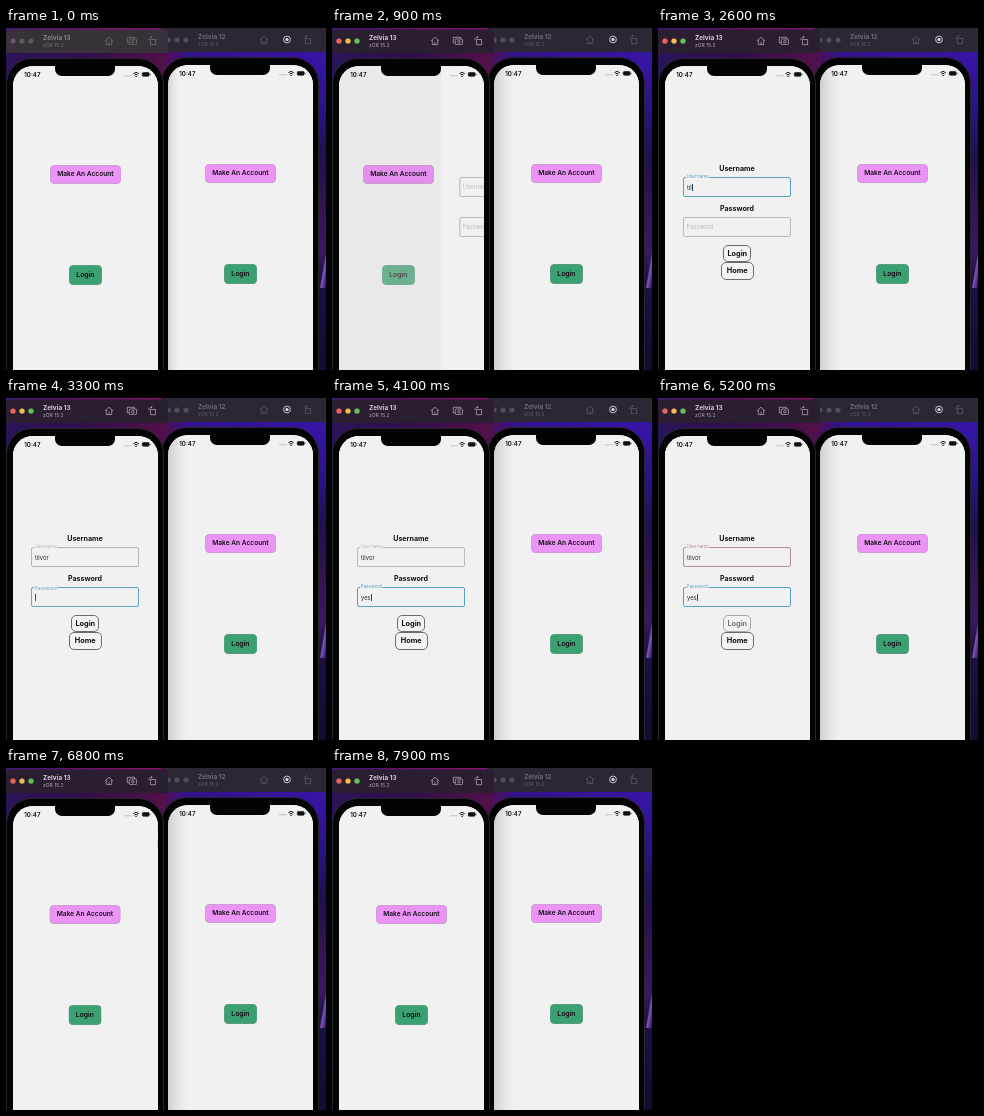
An HTML page for the animation above (8 s loop, 320 by 342 pixels).

```html
<!DOCTYPE html>
<html lang="en">
<head>
<meta charset="utf-8">
<title>Two phones: login flow</title>
<style>
html, body { margin: 0; width: 100%; height: 100%; overflow: hidden; background: #1d0d3c; }
body { font-family: Inter, "Liberation Sans", sans-serif; }
div, span, i, svg { box-sizing: border-box; }
.stage {
  position: relative; width: 320px; height: 342px; overflow: hidden;
  background:
    linear-gradient(90deg, #3f1a78, #6a1266 50%, #8a1470) 0 0 / 163px 4px no-repeat,
    linear-gradient(90deg, #2a1458, #300e4a 25%, #521048 50%, #33128c 58%, #3614a4) 0 0 / 312px 60px no-repeat,
    linear-gradient(100deg, #0000 98%, #7f56b4 98.4%, #50288a 99.4%, #0000) 0 190px / 320px 70px no-repeat,
    linear-gradient(#3716a6 24px, #2b128a 80px, #20104e 130px, #341454 180px, #3a1766 225px, #1c1046 250px, #150a33);
}
.win, .bar, .phone, .screen, .notch, .page, .page div, .page span, .over, .shade { position: absolute; }
.win { top: 0; left: 0; width: 164px; height: 344px; }
.right { left: 155px; top: -1px; }

/* title bar */
.bar { left: 0; top: 0; width: 162px; height: 25px; background: #38313a; color: #8b828d; }
.right .bar { width: 164px; background: #2d2733; color: #716878; }
.left .bar { clip-path: inset(1.5px 0 0 round 4px 4px 0 0); animation: active 8s step-end infinite; }
.bar b, .bar small { position: absolute; left: 37px; white-space: nowrap; }
.bar b { top: 6px; font: 700 6.4px/8px Inter, sans-serif; }
.bar small { top: 13.5px; font: 400 5px/7px Inter, sans-serif; opacity: .8; }
.bar svg { position: absolute; left: 0; top: 0; }
.lights { animation: lights 8s step-end infinite; }
.line { fill: none; stroke: currentColor; stroke-width: .7; opacity: .85; }

/* device */
.phone { left: .3px; top: 30.2px; width: 158px; height: 340px; border-radius: 26px; background: #030304; border: 1px solid #28242e; }
.screen { left: 6.5px; top: 37.5px; width: 145px; height: 320px; border-radius: 20px 20px 0 0; overflow: hidden; background: #f1f1f1; }
.notch { left: 49px; top: 36px; width: 60px; height: 12px; border-radius: 0 0 7px 7px; background: #030304; }
.over { left: 0; top: 0; }
.page { left: .5px; top: 0; width: 145px; height: 320px; background: #f1f1f1; }
.shade { left: 162px; top: 40px; width: 20px; height: 302px; transform-origin: left; background: linear-gradient(90deg, #0002, #0000000c 50%, #0000); animation: shade 8s step-end infinite; }

/* home page */
.page .btn { display: flex; align-items: center; justify-content: center; border-radius: 4px; font-weight: 600; color: #120c14; white-space: nowrap; }
.make, .go { height: 19.7px; }
.make { left: 37px; top: 99px; width: 70.8px; font-size: 6.6px; background: #ec93f6; border: 1px solid #cf9dd6; }
.go { left: 56px; top: 199.5px; width: 32.8px; font-size: 6.8px; background: #3ba072; border: 1px solid #579c80; }
.left .go { animation: tapGo 8s linear infinite; }
.left .home { animation: under 8s ease infinite; }
.dim { inset: 0; background: #000; opacity: 0; animation: dim 8s ease infinite; }

/* login page */
.form { transform: translateX(146px); animation: slide 8s ease infinite; }
.up, .down { left: 0; top: 0; width: 145px; }
.up { animation: up 8s step-end infinite; }
.down { animation: down 8s step-end infinite; }
.head { left: 0; width: 144px; text-align: center; font: 700 7.1px/10px Inter, sans-serif; color: #111; }
.field { left: 17.6px; width: 108.8px; height: 20.4px; border: 1px solid; border-radius: 2px; color: #bcbcbc; font-size: 5.8px; box-shadow: inset 0 0 1.5px #0001; }
.user { animation: userTone 8s linear infinite; }
.pass { animation: passTone 8s linear infinite; }
.tag { left: 2.8px; top: 6px; padding: 0 .6px; line-height: 6px; background: #f1f1f1; transform-origin: left; }
.user .tag { animation: floatUser 8s ease-out infinite; }
.pass .tag { animation: floatPass 8s ease-out infinite; }
.val { left: 3.4px; top: .5px; line-height: 18px; color: #2a2a2a; white-space: nowrap; }
.val i { font-style: normal; font-size: 0; animation: type 8s var(--d) step-end infinite; }
.val u { display: inline-block; width: .7px; height: 7px; vertical-align: -1.5px; background: #23506c; opacity: 0; }
.user u { animation: caretUser 8s step-end infinite; }
.pass u { animation: caretPass 8s step-end infinite; }
.err { left: 22.2px; top: 130.3px; font-size: 4.5px; line-height: 6px; color: #b02a40; white-space: nowrap; opacity: 0; animation: err 8s linear infinite; }
.page .out { height: 17.8px; border: 1px solid #6c6c6c; border-radius: 5px; font-size: 7.3px; font-weight: 700; background: #f3f3f3; }
.login { left: 58.4px; top: 179px; width: 27.8px; animation: tapLogin 8s linear infinite; }
.back { left: 56px; top: 196.5px; width: 32.5px; animation: tapBack 8s linear infinite; }

/* window focus */
@keyframes active { 0% { background: #38313a; color: #8b828d; } 7.5%, to { background: #291f30; color: #d6cdda; } }
@keyframes lights { 0% { opacity: 0; } 7.5%, to { opacity: 1; } }
@keyframes shade { 0% { transform: scaleX(.5); } 7.5%, to { transform: none; } }

/* push at 0.8 s, pop at 6.37 s */
@keyframes slide { 0%, 10% { transform: translateX(146px); } 16.25%, 79.61% { transform: translateX(0); } 85.86%, to { transform: translateX(146px); } }
@keyframes under { 0%, 10% { transform: translateX(0); } 16.25%, 79.61% { transform: translateX(-43.5px); } 85.86%, to { transform: translateX(0); } }
@keyframes dim { 0%, 10% { opacity: 0; } 16.25%, 79.61% { opacity: .1; } 85.86%, to { opacity: 0; } }

/* taps */
@keyframes tapGo { 0%, 7.5% { opacity: 1; } 9.4% { opacity: .3; } 12.5%, to { opacity: 1; } }
@keyframes tapLogin { 0%, 62.5% { opacity: 1; } 64% { opacity: .25; } 66.5%, to { opacity: 1; } }
@keyframes tapBack { 0%, 77.5% { opacity: 1; } 79.4%, 80% { opacity: .2; } 83%, to { opacity: 1; } }

/* fields */
@keyframes userTone { 0%, 25% { color: #bcbcbc; } 26.5%, 40% { color: #57a4c6; } 41.5%, 64.4% { color: #bcbcbc; } 66.25%, 90% { color: #ab2f46; } 92%, to { color: #bcbcbc; } }
@keyframes passTone { 0%, 40% { color: #bcbcbc; } 41.5%, 78.5% { color: #55a3c9; } 80% { color: #66b8e2; } 84%, to { color: #bcbcbc; } }
@keyframes floatUser { 0%, 25% { transform: none; } 26.9%, 90% { transform: translateY(-10.5px) scale(.8); } 92%, to { transform: none; } }
@keyframes floatPass { 0%, 40% { transform: none; } 41.9%, 90% { transform: translateY(-10.5px) scale(.8); } 92%, to { transform: none; } }
@keyframes type { 0% { font-size: 5.8px; } 58.75%, to { font-size: 0; } }
@keyframes caretUser { 0% { opacity: 0; } 25% { opacity: 1; } 40%, to { opacity: 0; } }
@keyframes caretPass { 0% { opacity: 0; } 40% { opacity: 1; } 53.75% { opacity: 0; } 60% { opacity: 1; } 66.25% { opacity: 0; } 72.5% { opacity: 1; } 77.5%, to { opacity: 0; } }

/* error makes room for its line */
@keyframes up { 0% { transform: none; } 66.25% { transform: translateY(-2.3px); } 90%, to { transform: none; } }
@keyframes down { 0% { transform: none; } 66.25% { transform: translateY(2.3px); } 90%, to { transform: none; } }
@keyframes err { 0%, 66.25% { opacity: 0; } 68.1%, 90% { opacity: 1; } 92%, to { opacity: 0; } }
</style>
</head>
<body>
<svg width="0" height="0" style="position:absolute">
  <defs>
    <g id="dots"><circle cx="7" cy="13" r="2.6"/><circle cx="16" cy="13" r="2.6"/><circle cx="25" cy="13" r="2.6"/></g>
    <g id="tools" class="line">
      <path d="M99 12.8 103 9.2l4 3.600M100.300 12v4.600h5.400V12M103 16.600v-2.800"/>
      <path d="M144.400 11.500h5.200v5.200h-5.200zM142.800 12c.2-1.800 1.200-2.800 3.200-2.900M145 8.200l1.200.9-1.100 1"/>
    </g>
    <g id="status">
      <text x="18.3" y="48.8" font-size="6.1" font-weight="600" fill="#111">10:47</text>
      <path d="M118.500 47.800h7" stroke="#999" stroke-dasharray="1 1"/>
      <g fill="none" stroke="#111">
        <path d="M127.400 45.700a3.800 3.800 0 0 1 5.400 0M128.600 47.100a2.100 2.100 0 0 1 3 0"/>
        <rect x="136.300" y="44.500" width="6.800" height="3.800" rx="1" fill="#111" stroke-width=".6"/>
        <path d="M144.100 45.700v1.400" stroke-width=".7"/>
      </g>
      <circle cx="130.100" cy="48.400" r=".7" fill="#111"/>
    </g>
  </defs>
</svg>

<div class="stage">
  <div class="win right">
    <div class="bar">
      <b>Zelvia 12</b><small>zOR 15.2</small>
      <svg width="164" height="25">
        <use href="#dots" fill="#544c5a"/><use href="#tools"/>
        <circle cx="126" cy="12.5" r="3.4" fill="none" stroke="#d8d2dc" stroke-width=".9"/><circle cx="126" cy="12.5" r="1.6" fill="#e6e0e9"/>
      </svg>
    </div>
    <div class="phone"></div>
    <div class="screen">
      <div class="page home">
        <div class="btn make">Make An Account</div>
        <div class="btn go">Login</div>
      </div>
    </div>
    <div class="notch"></div>
    <svg class="over" width="164" height="60"><use href="#status"/></svg>
  </div>

  <div class="shade"></div>

  <div class="win left">
    <div class="bar">
      <b>Zelvia 13</b><small>zOR 15.2</small>
      <svg width="162" height="25">
        <use href="#dots" fill="#5f5762"/>
        <g class="lights">
          <circle cx="7" cy="13" r="2.6" fill="#ee6259"/><circle cx="16" cy="13" r="2.6" fill="#f3bd4e"/><circle cx="25" cy="13" r="2.6" fill="#60c354"/>
        </g>
        <use href="#tools"/>
        <g class="line">
          <path d="M123 14.800h-1.700V9.300h7.200v1.500"/>
          <rect x="123.3" y="11" width="7.2" height="5.6" rx=".8"/><circle cx="126.9" cy="13.8" r="1.3"/>
        </g>
      </svg>
    </div>
    <div class="phone"></div>
    <div class="screen">
      <div class="page home">
        <div class="btn make">Make An Account</div>
        <div class="btn go">Login</div>
        <div class="dim"></div>
      </div>
      <div class="page form">
        <div class="up">
          <div class="head" style="top:98px">Username</div>
          <div class="field user" style="top:111.5px">
            <span class="tag">Username</span>
            <span class="val"><i style="--d:2.25s">t</i><i style="--d:2.4s">i</i><i style="--d:2.55s">l</i><i style="--d:2.72s">v</i><i style="--d:2.85s">o</i><i style="--d:2.98s">r</i><u></u></span>
          </div>
        </div>
        <div class="err">Username not found</div>
        <div class="down">
          <div class="head" style="top:138px">Password</div>
          <div class="field pass" style="top:151.5px">
            <span class="tag">Password</span>
            <span class="val"><i style="--d:3.4s">y</i><i style="--d:3.55s">e</i><i style="--d:3.7s">s</i><u></u></span>
          </div>
          <div class="btn out login">Login</div>
          <div class="btn out back">Home</div>
        </div>
      </div>
    </div>
    <div class="notch"></div>
    <svg class="over" width="164" height="60"><use href="#status"/></svg>
  </div>
</div>
</body>
</html>
```
